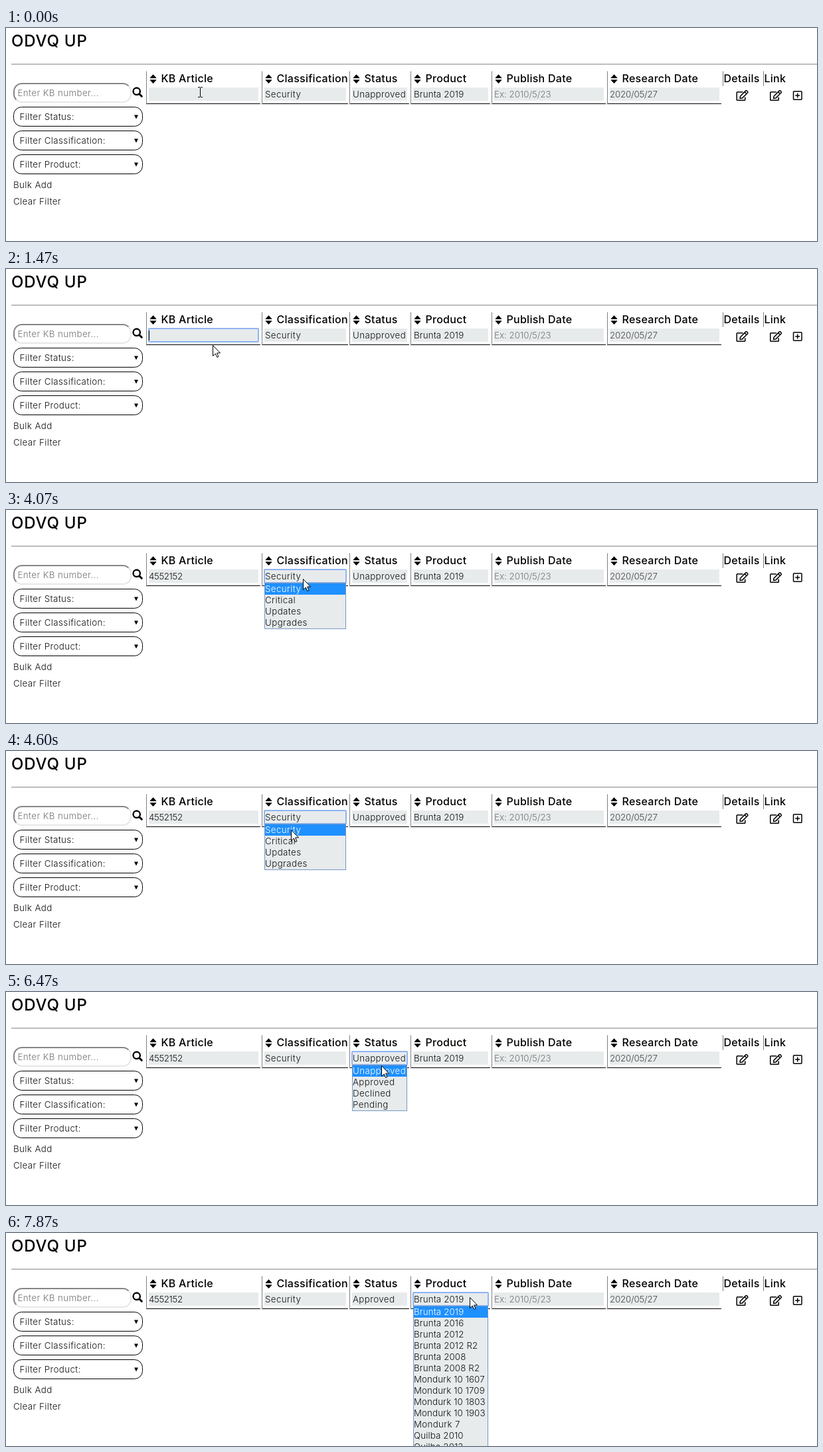
An HTML page that plays this animation: 1221 by 322 pixels, repeating every 8 s.

```html
<!DOCTYPE html>
<html lang="en">
<head>
<meta charset="utf-8">
<title>Update list</title>
<style>
  html, body { margin: 0; width: 100%; height: 100%; overflow: hidden; background: #fff; }
  svg { display: block; width: 1221px; height: 322px; overflow: hidden; }
  text { font: 300 13.33px Inter, "Open Sans", sans-serif; fill: #111; white-space: pre; }
  .title { font-size: 24px; font-weight: 500; letter-spacing: .8px; fill: #000; }
  .head { font-size: 16px; font-weight: 500; letter-spacing: .27px; fill: #000; }
  .hint { fill: #757575; }
  .soft { fill: #444; }
  .lit { fill: #fff; }
  .line { fill: none; stroke: #000; }
  .ring { fill: none; stroke: #8fb4f4; stroke-width: 2; }
</style>
</head>
<body>
<svg id="stage" viewBox="0 0 1221 322" xmlns="http://www.w3.org/2000/svg"></svg>
<script>
const stage = document.getElementById('stage');
const TICK = 1000 / 15, LOOP = 8000;

// Digits are set tighter than letters.
const track = s => (.4 - .75 * s.replace(/\D/g, '').length / s.length).toFixed(2);
const text = (x, y, s, cls = '', id = '') =>
  `<text x="${x}" y="${y}" class="${cls}" id="${id}" letter-spacing="${track(s)}">${s}</text>`;
const head = (x, s) => `<text x="${x}" y="82" class="head">${s}</text>`;
const rect = (x, y, w, h, fill, more = '') =>
  `<rect x="${x}" y="${y}" width="${w}" height="${h}" fill="${fill}" ${more}/>`;
const path = (d, more = 'class="line"') => `<path d="${d}" ${more}/>`;
const dots = (x, end) => path(`M${x + .5} 66V${end}`, 'class="line" stroke-dasharray="1 1"');

const columns = [
  { name: 'KB Article', x: 211, end: 383, value: '' },
  { name: 'Classification', x: 385, end: 515, value: 'Security' },
  { name: 'Status', x: 517, end: 607, value: 'Unapproved' },
  { name: 'Product', x: 609, end: 729, value: 'Brunta 2019' },
  { name: 'Publish Date', x: 731, end: 903, value: 'Ex: 2010/5/23', cls: 'hint' },
  { name: 'Research Date', x: 905, end: 1077, value: '2020/05/27', cls: 'soft' }
];
const cell = c => [c.x + 4, c.end - c.x - 7];

const menus = {
  1: ['Security', 'Critical', 'Updates', 'Upgrades'],
  2: ['Unapproved', 'Approved', 'Declined', 'Pending'],
  3: [
    ...['2019', '2016', '2012', '2012 R2', '2008', '2008 R2'].map(v => 'Brunta ' + v),
    ...['10 1607', '10 1709', '10 1803', '10 1903', '7'].map(v => 'Mondurk ' + v),
    'Quilba 2010', 'Quilba 2013'
  ]
};

function column(c, i) {
  const [x, w] = cell(c);
  return dots(c.x, 114) + path(`M${c.x} 114.5H${c.end}`) +
    path(`M${c.x + 6} 75.5l4.5-5 4.5 5zm0 3h9l-4.5 5z`,
      'stroke="#000" stroke-width=".8" stroke-linejoin="round"') +
    head(c.x + 22.5, c.name) + rect(x, 90, w, 20, '#e7ebec') +
    text(x + (i && i < 4 ? 1 : 0), 105, c.value, c.cls, 'value' + i) +
    (i < 4 ? rect(x, 90, w, 20, 'none', `rx="1" class="ring" id="ring${i}"`) : '');
}

function filter(y, label) {
  return rect(11.5, y + .5, 194, 29, '#fff', 'rx="12" stroke="#000"') +
    text(20.5, y + 20, label) + path(`M193 ${y + 12.5}h6l-3 6z`, '');
}

function menu(i) {
  const [x, w] = cell(columns[i]), items = menus[i];
  return `<g id="menu${i}">` +
    rect(x + .5, 110.5, w - 1, items.length * 17 + 1, '#e7ebec', 'stroke="#7797c4"') +
    rect(x + 1, 111, w - 2, 17, '#1e90ff', `id="mark${i}"`) +
    items.map((s, n) => text(x + 1, 124 + 17 * n, s)).join('') + '</g>';
}

function edit(x) {
  return `<g transform="translate(${x} 94)" class="line" stroke-width="1.5" stroke-linejoin="round">` +
    path('M10 2.75H1.5q-.75 0-.75.75v11q0 .75.75.75h11q.75 0 .75-.75v-4', '') +
    path('M5.9 9.2L14.2.9q.8-.7 1.6 0l1.3 1.3q.7.8 0 1.6L8.8 12.1l-3.2.4zM12.6 2.6l2.9 2.9', '') + '</g>';
}

// Inset border: dark above and left, light below and right.
const searchBox =
  path('M15.5 108.5A12 12 0 0 1 12 100V96A12 12 0 0 1 24 84H176A12 12 0 0 1 184.5 87.5',
    'fill="none" stroke="#858585" stroke-width="2"') +
  path('M184.5 87.5A12 12 0 0 1 188 96V100A12 12 0 0 1 176 112H24A12 12 0 0 1 15.5 108.5',
    'fill="none" stroke="#e6e6e6" stroke-width="2"');

stage.innerHTML =
  '<text x="8" y="28" class="title">ODVQ UP</text>' +
  rect(8, 54, 1213, 1, '#9a9a9a') + rect(8, 55, 1213, 1, '#e4e4e4') +
  searchBox + text(17.5, 103, 'Enter KB number...', 'hint') +
  '<circle cx="196.7" cy="95.7" r="5.2" class="line" stroke-width="2.4"/>' +
  path('M200.7 99.7l3.6 3.6', 'class="line" stroke-width="3" stroke-linecap="round"') +
  filter(119, 'Filter Status:') + filter(155, 'Filter Classification:') + filter(191, 'Filter Product:') +
  text(11, 242, 'Bulk Add') + text(11, 267, 'Clear Filter') +
  columns.map(column).join('') +
  dots(1079, 88) + dots(1140, 88) + head(1080.5, 'Details') + head(1141.5, 'Link') +
  edit(1099.5) + edit(1150) +
  rect(1185.5, 95.75, 12.5, 12.5, 'none', 'rx="1" stroke="#000" stroke-width="1.5"') +
  path('M1188.2 102h7M1191.7 98.5v7', 'class="line" stroke-width="1.5"') +
  rect(215, 93, 1, 15, '#000', 'id="caret"') +
  Object.keys(menus).map(menu).join('') +
  path('M.5.5V16.5L4.3 13L6.8 18.5L9 17.5L6.6 12H11.5Z', 'id="arrow" fill="#fff" stroke="#000"') +
  path('M-3-7.5H0M1-7.5H4M.5-7V7M-3 7.5H0M1 7.5H4', 'id="beam" class="line"');

const el = id => document.getElementById(id);
const show = (id, on) => { el(id).style.display = on ? '' : 'none'; };

function setText(node, s) {
  node.textContent = s;
  node.setAttribute('letter-spacing', track(s));
}

// Pointer stops: tick, x, y.
const stops = [
  [0, 292, 97], [6, 292, 97], [7, 295, 94], [9, 307, 108], [14, 349, 155],
  [19, 322, 119], [22, 311, 115], [24, 315, 117], [28, 364, 119], [32, 421, 114],
  [34, 449, 101], [60, 449, 101], [61, 447, 104], [69, 429, 119], [72, 429, 119],
  [80, 568, 102], [96, 568, 102], [100, 556, 137], [106, 556, 137],
  [109, 697, 97], [111, 697, 97], [112, 698, 97], [120, 698, 97]
];

function pointer(k) {
  const n = stops.findIndex(s => s[0] > k);
  const [t0, x0, y0] = stops[n - 1], [t1, x1, y1] = stops[n];
  const p = (k - t0) / (t1 - t0);
  return [Math.round(x0 + (x1 - x0) * p), Math.round(y0 + (y1 - y0) * p)];
}

const within = (k, a, b) => k >= a && k < b;

function render(t) {
  const k = Math.min(119, Math.floor((t + 5) / TICK));
  const [x, y] = pointer(k);
  const beam = x >= 215 && x < 380 && y >= 90 && y < 111;
  show('beam', beam);
  show('arrow', !beam);
  el(beam ? 'beam' : 'arrow').setAttribute('transform', `translate(${x} ${y})`);

  const focus = k < 3 ? -1 : k < 38 ? 0 : k < 84 ? 1 : k < 117 ? 2 : 3;
  for (let i = 0; i < 4; i++) show('ring' + i, i === focus);

  const filled = k >= 25;
  setText(el('value0'), filled ? '4552152' : ' ');
  setText(el('value2'), k < 106 ? 'Unapproved' : 'Approved');
  const blink = Math.floor((k - (filled ? 25 : 3)) * TICK / 530) % 2 === 0;
  show('caret', focus === 0 && blink && k < 33);
  el('caret').setAttribute('x', filled ? 267 : 215);

  show('menu1', within(k, 38, 73));
  show('menu2', within(k, 84, 106));
  show('menu3', k >= 118);
  const picked = { 1: 0, 2: k >= 99 ? 1 : 0, 3: 0 };
  for (const i in menus) {
    el('mark' + i).setAttribute('y', 111 + 17 * picked[i]);
    el('menu' + i).querySelectorAll('text').forEach((node, n) =>
      node.setAttribute('class', n === picked[i] ? 'lit' : ''));
  }
}

const start = performance.now();
function frame() {
  render((performance.now() - start) % LOOP);
  requestAnimationFrame(frame);
}
frame();
</script>
</body>
</html>
```
